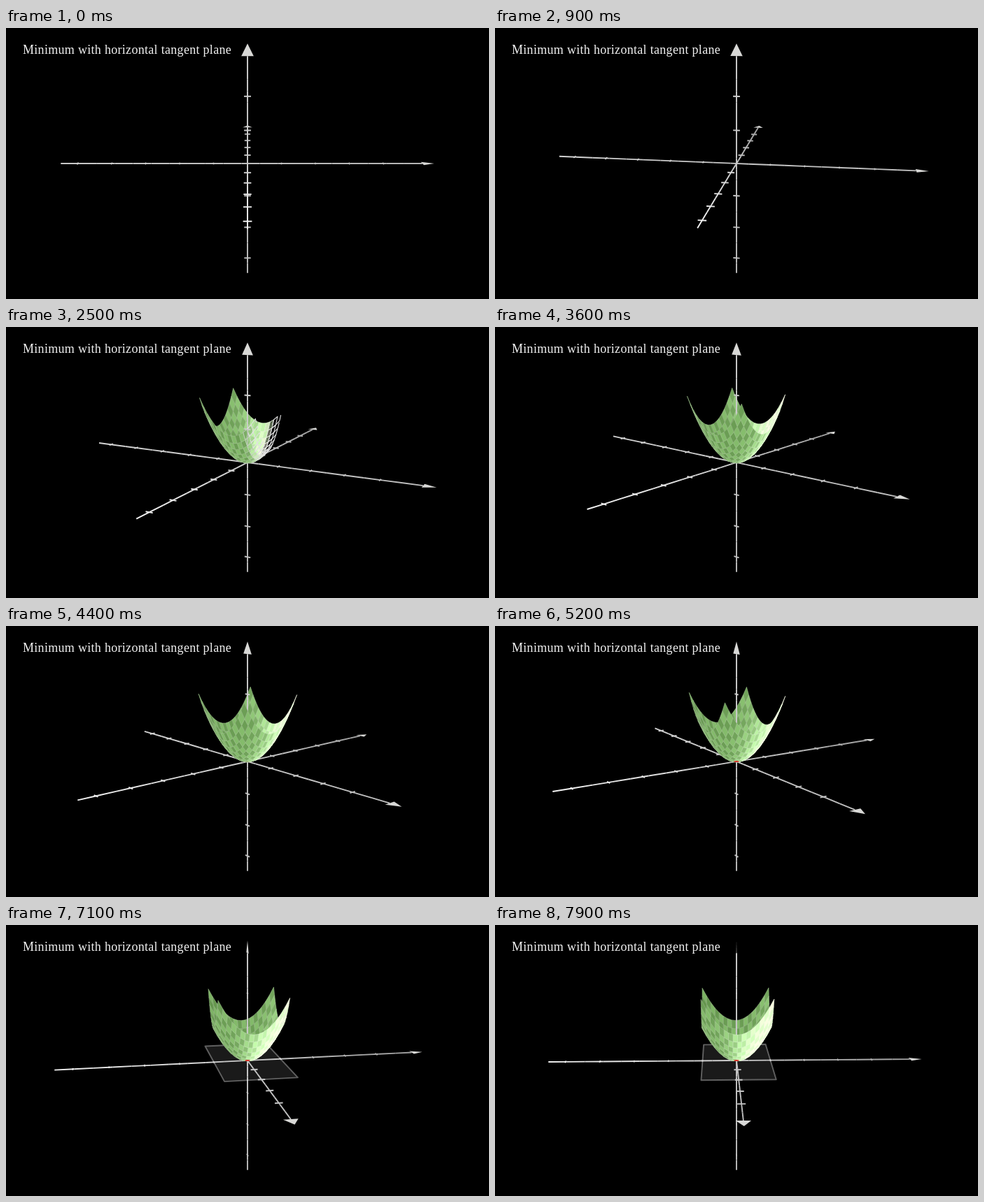
Animation, 690 px wide and 388 px high, one loop 8 s. Source, as an HTML page with a canvas:

```html
<!DOCTYPE html>
<html lang="en">
<head>
<meta charset="utf-8">
<title>Minimum with horizontal tangent plane</title>
<style>
  html, body { margin: 0; width: 690px; height: 388px; overflow: hidden; background: #000; }
  canvas { position: absolute; left: 0; top: 0; width: 690px; height: 388px; }
  p {
    position: absolute; left: 24px; top: 20px; margin: 0; white-space: nowrap;
    color: #f0f0f0; font: 18px/22px "Liberation Serif", "Times New Roman", serif; letter-spacing: .3px;
  }
</style>
</head>
<body>
<canvas></canvas>
<p>Minimum with horizontal tangent plane</p>
<script>
const W = 690, H = 388, UNIT = 48.5, FOCAL = 20, LOOP = 8;
const PHI = 75 * Math.PI / 180, SIN = Math.sin(PHI), COS = Math.cos(PHI);
const LIGHT = [-7, -9, 10];
const GREENS = [[131, 186, 106], [107, 157, 84]];
const GRID = [205, 212, 200];
const N = 16;                        // surface cells per side
const WRITE = { start: 1.12, length: 2, lag: 4 / (N * N + 1) };

const canvas = document.querySelector('canvas');
const scale = window.devicePixelRatio || 1;
canvas.width = W * scale;
canvas.height = H * scale;
const ctx = canvas.getContext('2d');
ctx.lineJoin = 'round';

const clamp = v => Math.min(1, Math.max(0, v));
const smooth = v => { const c = clamp(v); return c * c * c * (c * (6 * c - 15) + 10); };
const mix = (a, b, k) => a + (b - a) * k;
const lerp = (p, q, k) => p.map((v, i) => mix(v, q[i], k));
const center = pts => [0, 1, 2].map(k => pts.reduce((s, p) => s + p[k], 0) / pts.length);
const unit = v => { const l = Math.hypot(...v); return v.map(c => c / l); };

let cosA = 1, sinA = 0;
const spinY = ([x, y]) => y * cosA - x * sinA;
const depth = p => p[2] * COS - spinY(p) * SIN;
function project(p) {
  const k = UNIT * FOCAL / (FOCAL - depth(p));
  return [W / 2 + (p[0] * cosA + p[1] * sinA) * k, H / 2 - (spinY(p) * COS + p[2] * SIN) * k];
}

function trace(pts, close) {
  ctx.beginPath();
  pts.forEach(p => ctx.lineTo(...project(p)));
  if (close) ctx.closePath();
}
function stroke(color, width) {
  ctx.strokeStyle = color;
  ctx.lineWidth = width;
  ctx.stroke();
}
function fill(color) {
  ctx.fillStyle = color;
  ctx.fill();
}

// Every part is { at, draw(t) }, painted from far to near.
const parts = [];

function addLine(a, b) {
  const at = center([a, b]);
  const g = Math.round(200 - 8 * at[1] - 2 * at[0] + 3 * at[2]);
  const color = `rgb(${g},${g},${g})`;
  parts.push({ at, draw() { trace([a, b]); stroke(color, 1.9); } });
}

function addAxis(dir, side, reach) {
  const point = (along, across = 0) => dir.map((d, i) => d * along + side[i] * across);
  const end = reach - .35, pieces = 20;
  for (let i = 0; i < pieces; i++)
    addLine(point(mix(-reach, end, i / pieces)), point(mix(-reach, end, (i + 1) / pieces)));
  for (let k = Math.ceil(-reach); k < reach - 1; k++)
    if (k) addLine(point(k, -.1), point(k, .1));
  const tip = [point(reach), point(end, .175), point(end, -.175)];
  parts.push({ at: center(tip), draw() { trace(tip, true); fill('#d8d8d6'); } });
}

function shade(rgb, [x, y, z]) {
  const normal = unit([-2 * x, -2 * y, 1]);
  const sun = unit([LIGHT[0] - x, LIGHT[1] - y, LIGHT[2] - z]);
  const dot = normal.reduce((s, v, i) => s + v * sun[i], 0);
  const glow = 255 * .5 * dot ** 3 * (dot < 0 ? .5 : 1);
  return rgb.map(c => Math.round(Math.min(255, Math.max(0, c + glow))));
}

function partialOutline(corners, k) {
  const n = corners.length, full = Math.min(n, Math.floor(k * n));
  const pts = corners.concat([corners[0]]);
  const out = pts.slice(0, full + 1);
  if (full < n) out.push(lerp(pts[full], pts[full + 1], k * n - full));
  return out;
}

function addFace(i, j) {
  const bowl = (a, b) => {
    const x = 2 * a / N - 1, y = 2 * b / N - 1;
    return [x, y, x * x + y * y];
  };
  const corners = [bowl(i, j), bowl(i + 1, j), bowl(i + 1, j + 1), bowl(i, j + 1)];
  const at = center(corners), rgb = shade(GREENS[(i + j) % 2], at);
  const seam = lerp(rgb, shade(GRID, at), .4);
  const order = i * N + j, span = 1 + (N * N - 1) * WRITE.lag;
  parts.push({
    at,
    draw(t) {
      const k = clamp(clamp((t - WRITE.start) / WRITE.length) * span - order * WRITE.lag);
      if (!k) return;
      if (k < .5) {
        trace(partialOutline(corners, k * 2));
        return stroke('#e0e0e0', 1.1);
      }
      const f = k * 2 - 1;
      trace(corners, true);
      fill(`rgba(${rgb},${f})`);
      const edge = lerp([224, 224, 224], seam, f).map(Math.round);
      stroke(`rgb(${edge})`, mix(1.1, .6, f));
    }
  });
}

function addPlane() {
  const corners = [[-2, -1, 0], [2, -1, 0], [2, 1, 0], [-2, 1, 0]];
  parts.push({
    at: [0, 0, 0],
    draw(t) {
      const k = smooth(t - 5.2);
      if (!k) return;
      trace(corners, true);
      fill(`rgba(255,255,255,${.1 * k})`);
      stroke(`rgba(255,255,255,${.34 * k})`, 1.9);
    }
  });
}

function drawDot(t) {
  const k = smooth(t - 4.2);
  if (!k) return;
  const ring = Array.from({ length: 24 }, (_, i) => {
    const a = i * Math.PI / 12;
    return [.08 * Math.cos(a), .08 * Math.sin(a), 0];
  });
  trace(ring, true);
  fill(`rgba(216,50,42,${k})`);
}

addAxis([1, 0, 0], [0, 1, 0], 5.5);
addAxis([0, 1, 0], [1, 0, 0], 5.5);
addAxis([0, 0, 1], [1, 0, 0], 3.5);
addPlane();
for (let i = 0; i < N; i++)
  for (let j = 0; j < N; j++) addFace(i, j);

function render(t) {
  const angle = Math.max(0, t - .118) * 11.347 * Math.PI / 180;
  cosA = Math.cos(angle);
  sinA = Math.sin(angle);
  ctx.setTransform(scale, 0, 0, scale, 0, 0);
  ctx.clearRect(0, 0, W, H);
  for (const part of parts) part.depth = depth(part.at);
  parts.sort((a, b) => a.depth - b.depth);
  for (const part of parts) part.draw(t);
  drawDot(t);
}

let start;
function tick(now) {
  start ??= now;
  render((now - start) / 1000 % LOOP);
  requestAnimationFrame(tick);
}
render(0);
requestAnimationFrame(tick);
</script>
</body>
</html>
```
